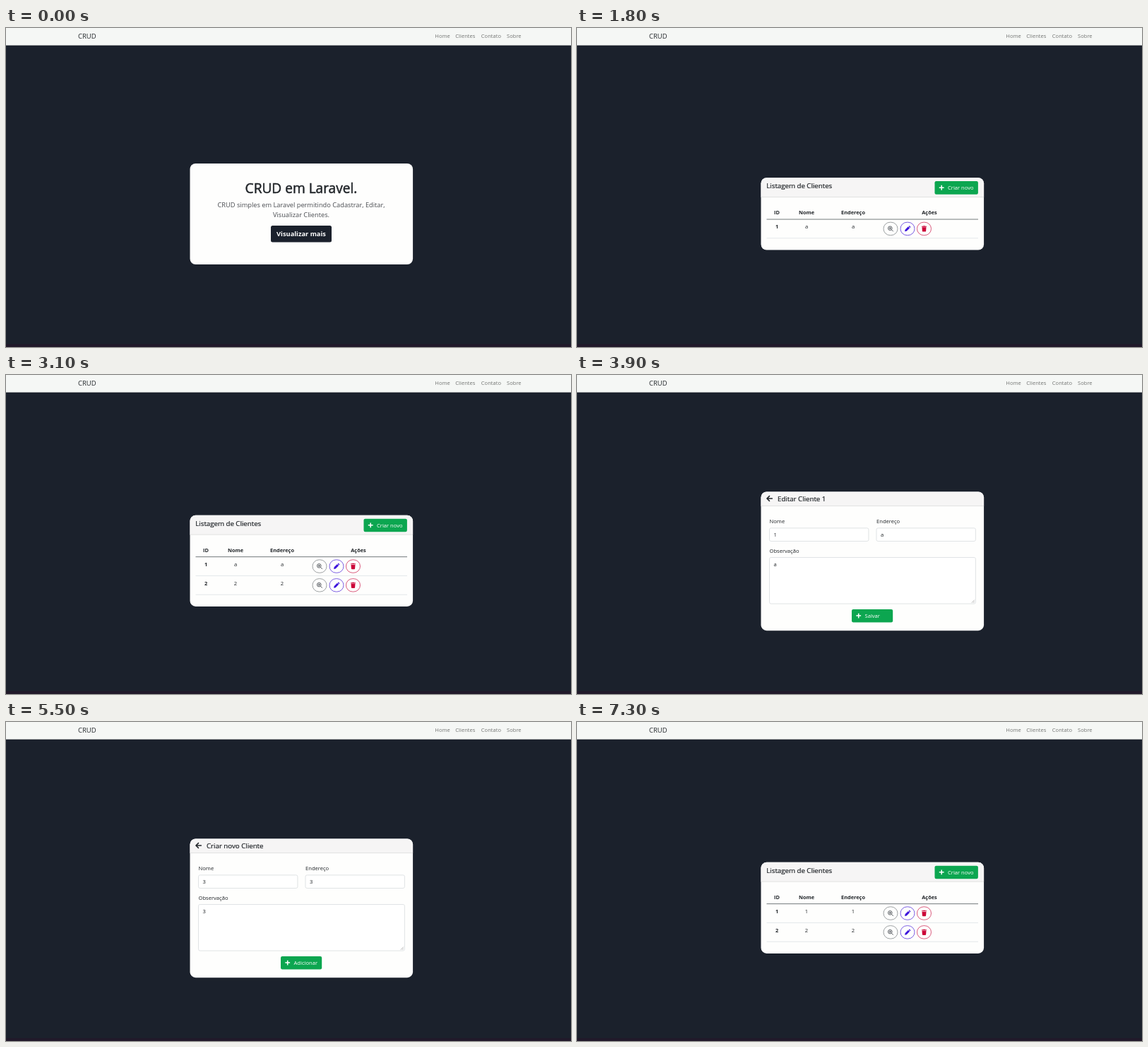
These frames come from a looping animation (800 by 452 pixels, 7.4 s). An HTML page:

```html
<!DOCTYPE html>
<html lang="pt-BR">
<head>
<meta charset="utf-8">
<title>CRUD</title>
<style>
html, body { margin: 0; width: 100%; height: 100%; overflow: hidden; background: #1b212c; }
svg { display: block; }
text { font: 7.6px "Open Sans", "Noto Sans", sans-serif; fill: #212529; white-space: pre; }
.nav { fill: #737573; }
.hint { fill: #74777b; }
.white { fill: #fff; }
.mid { text-anchor: middle; }
.bold { font-weight: 700; font-size: 7.4px; }
.head { font-size: 9.7px; stroke: #212529; stroke-width: .22px; }
.h2 { font-size: 15.2px; stroke: #212529; stroke-width: .35px; }
.h1 { font-size: 19.1px; stroke: #212529; stroke-width: .5px; }
.lead { font-size: 9.25px; fill: #484b50; }
.more { font-size: 9.3px; font-weight: 700; }
</style>
</head>
<body>
<svg width="800" height="452" viewBox="0 0 800 452">
  <rect width="800" height="24.6" fill="#f5f7f5"/>
  <rect y="448" width="800" height="4" fill="#21192a"/>
  <text x="102" y="14.6" style="font-size:9.5px">CRUD</text>
  <g id="links"></g>
  <g id="page"></g>
</svg>
<script>
const GREEN = '#0ca650', LINE = '#d9dcdf';
const $ = id => document.getElementById(id);

const text = (x, y, s, cls = '') => `<text x="${x}" y="${y}" class="${cls}">${s}</text>`;
const box = (x, y, w, h, r, fill, stroke = 'none') =>
  `<rect x="${x}" y="${y}" width="${w}" height="${h}" rx="${r}" fill="${fill}" stroke="${stroke}" stroke-width=".8"/>`;
const rule = (x, y, w, color) => `<path d="M${x} ${y}h${w}" stroke="${color}" stroke-width=".8"/>`;
const path = (x, y, d, attrs) => `<path transform="translate(${x} ${y})" d="${d}" ${attrs}/>`;
const line = (color, w) => `fill="none" stroke="${color}" stroke-width="${w}"`;

const plus = (x, y) => path(x, y, 'M-3.4 0H3.4M0-3.4V3.4', line('#fff', 1.5));
const arrow = (x, y) => path(x, y, 'M4.2 0H-3.4M.2-3.9L-3.7 0 .2 3.9', line('#212529', 1.5));
const plane = (x, y) => path(x, y, 'M4-4L-4 .6l2 .9L2.6-2.6-.9 2v2L.7 2.5 2.7 3.3z', 'fill="#fff"');
const zoom = (x, y) => path(x, y, 'M1.4 1.4L3.8 3.8M-2.3-.7h3.2M-.7-2.3v3.2M2.1-.7a2.8 2.8 0 1 1-5.6 0a2.8 2.8 0 1 1 5.6 0', line('#565b61', 1));
const pencil = (x, y) => path(x, y, 'M-3.9 3.9l.5-2.6L1-3.1 3.1-1-1.3 3.4zM1.6-3.6l.5-.4q.5-.4 1 0l1 1q.4.5 0 1l-.5.5z', 'fill="#3c12dc"');
const trash = (x, y) => path(x, y, 'M-3.5-3.7h2l.5-.5h2l.5.5h2v1h-7zM-3-2.1h6l-.4 5.3q-.1.9-1 .9h-3.2q-.9 0-1-.9z', 'fill="#cc0538"');

function card(x, y, w, h, head, title) {
  const r = 8;
  let s = box(x, y, w, h, r, '#fefefd');
  if (head) {
    s += `<path d="M${x} ${y + head}V${y + r}a${r} ${r} 0 0 1 ${r}-${r}H${x + w - r}a${r} ${r} 0 0 1 ${r} ${r}V${y + head}z" fill="#f6f5f5"/>`
      + rule(x, y + head, w, '#dcdcdc');
  }
  if (title) s += arrow(x + 12.2, y + 9.5) + text(x + 23.5, y + 13, title, 'head');
  return s;
}

function field(x, y, w, label, hint, value = '', h = 18.6) {
  let s = text(x, y, label) + box(x, y + 6.9, w, h, 2.2, '#fff', LINE)
    + text(x + 6, y + 19.2, value || hint, value ? '' : 'hint');
  if (h > 20) s += path(x + w - 1.5, y + h + 5.5, 'M-4 0L0-4M-1.8 0L0-1.8', line('#888', .6));
  return s;
}

const button = (x, y, w, label, tx, icon = '') =>
  box(x, y, w, 18.6, 2.2, GREEN) + icon + text(tx, y + 12.2, label, 'white');

const home = () => card(260.5, 192, 315.6, 143)
  + text(418, 234, 'CRUD em Laravel.', 'h1 mid')
  + text(418, 253.6, 'CRUD simples em Laravel permitindo Cadastrar, Editar,', 'lead mid')
  + text(418, 268.2, 'Visualizar Clientes.', 'lead mid')
  + box(375, 280, 86, 23.4, 2.5, '#1b212c')
  + text(418, 295, 'Visualizar mais', 'white more mid');

const contact = () => card(102.5, 144.5, 631.5, 238.7, 20, 'Formulário de Contato')
  + text(132, 251.8, 'Qualquer dúvida envie para nós', 'h2')
  + ['Lorem ipsum, dolor sit amet consectetur adipisicing elit. Provident,',
     'expedita assumenda. Consequuntur porro suscipit velit eum quas expedita',
     'quae, incidunt, iure excepturi eius nemo officiis ab ipsam earum et',
     'minima!.'].map((s, i) => text(132, 268.2 + i * 11.7, s)).join('')
  + field(424, 188.8, 143, 'Nome', 'Insira um nome')
  + field(578.5, 188.8, 143.4, 'E-mail', 'Insira um e-mail')
  + field(424, 230.7, 297.9, 'Endereço', 'Insira um endereço')
  + field(424, 272.5, 297.9, 'Observação', 'Insira uma observação', '', 65.6)
  + button(424, 352.5, 47.6, 'Enviar', 443.5, plane(434.3, 362));

function list(...names) {
  const pitch = 26.8, h = 75.5 + pitch * names.length, top = 263.4 - h / 2;
  let s = card(260.5, top, 315.6, h, 27.3)
    + text(268.3, top + 14.8, 'Listagem de Clientes', 'head')
    + button(506.5, top + 4.8, 61.4, 'Criar novo', 525, plus(516.2, top + 14))
    + [[283, 'ID'], [325, 'Nome'], [391, 'Endereço'], [499, 'Ações']]
      .map(([x, label]) => text(x, top + 51.8, label, 'bold mid')).join('')
    + rule(268.5, top + 58.8, 299.5, '#50575a');
  names.forEach((name, i) => {
    const y = top + 72.2 + i * pitch;
    s += text(283, y - .3, i + 1, 'bold mid') + text(325, y - .3, name, 'mid') + text(391, y - .3, name, 'mid');
    [[444, '#85898c', zoom], [468, '#5a35dc', pencil], [491.5, '#d0305c', trash]].forEach(([x, color, icon]) => {
      s += box(x - 10, y - 9.2, 20, 18.4, 9.2, 'none', color) + icon(x, y);
    });
    s += rule(268.5, y + 13.4, 299.5, '#dee2e6');
  });
  return s;
}

const form = (title, action, name, address, note) => card(260.5, 165.5, 315.6, 196.7, 20, title)
  + field(272.5, 210, 140.4, 'Nome', 'Insira um nome', name)
  + field(424, 210, 140.4, 'Endereço', 'Insira um endereço', address)
  + field(272.5, 251.6, 291.9, 'Observação', 'Insira uma observação', note, 65.6)
  + button(389, 331.9, 58.2, action, 407.5, plus(398.7, 341.1));
const create = (...values) => form('Criar novo Cliente', 'Adicionar', ...values);
const edit = (...values) => form('Editar Cliente 1', 'Salvar', ...values);

const detail = () => card(260.5, 189.6, 315.6, 148.4, 20, 'Detalhe do Cliente 3')
  + ['ID', 'Nome', 'Endereço', 'Observação'].map((label, i) =>
    text(418, 226.4 + i * 19.45, `<tspan class="bold">${label}:</tspan> 3`, 'mid')).join('')
  + button(373, 311, 90, 'Voltar para a listagem', 379.3);

// [start in ms, page, ...arguments]
const timeline = [
  [0, home], [900, contact], [1400, list, 'a'],
  [2000, create], [2300, create, 2], [2500, create, 2, 2], [2700, create, 2, 2, 2],
  [2900, list, 'a', 2],
  [3600, edit, 'a', 'a', 'a'], [3800, edit, 1, 'a', 'a'], [4000, edit, 1, 1, 'a'], [4200, edit, 1, 1, 1],
  [4400, list, 1, 2],
  [4800, create], [5100, create, 3], [5300, create, 3, 3], [5500, create, 3, 3, 3],
  [5800, list, 1, 2, 3], [6200, detail], [6600, list, 1, 2, 3], [7000, list, 1, 2]
];

$('links').innerHTML = [[607.3, 'Home'], [636.3, 'Clientes'], [672.8, 'Contato'], [709, 'Sobre']]
  .map(([x, label]) => text(x, 14, label, 'nav')).join('');

let shown;
const start = performance.now();
function draw() {
  const t = Math.max(0, performance.now() - start) % 7400;
  const step = timeline.findLast(([from]) => from <= t);
  if (step !== shown) {
    const [, page, ...args] = shown = step;
    $('page').innerHTML = page(...args);
  }
  requestAnimationFrame(draw);
}
draw();
</script>
</body>
</html>
```
